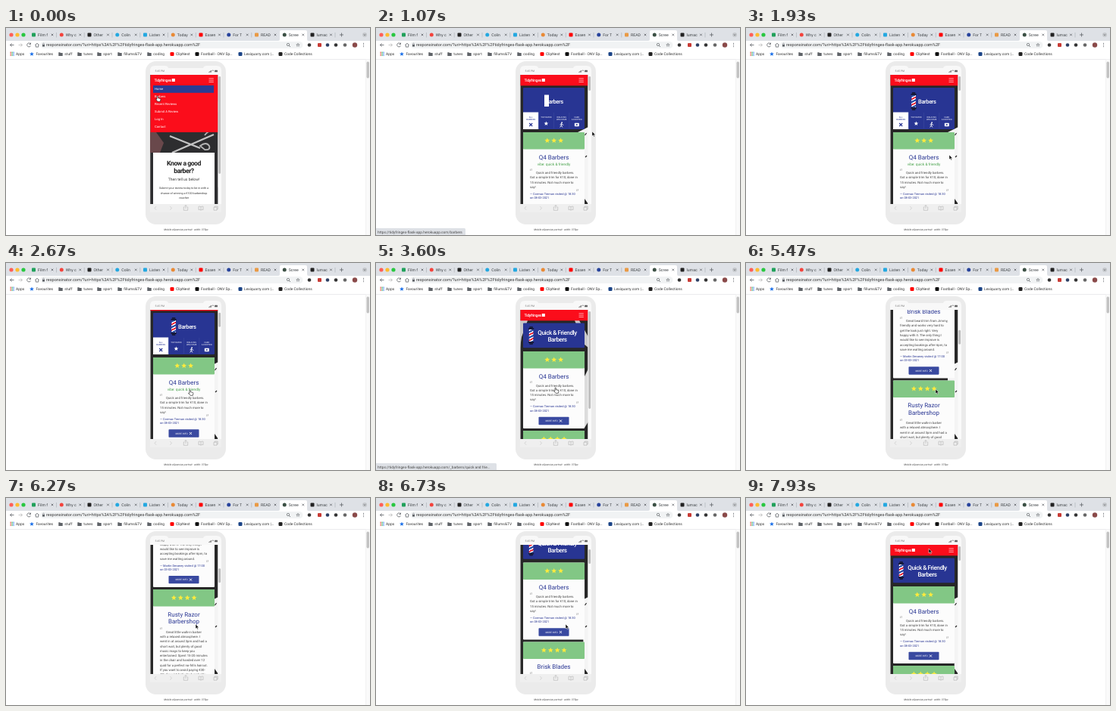
Recreate the animation shown at these times as an HTML page. Size 480x274 px, loop 8000 ms.

```html
<!DOCTYPE html>
<html lang="en">
<head>
<meta charset="utf-8">
<title>Barber reviews on a phone</title>
<style>
html, body { margin: 0; height: 100%; overflow: hidden; background: #fff; }
svg { display: block; width: 100vw; height: 100vh; font-family: Roboto, "Open Sans", sans-serif; text-rendering: geometricPrecision; }
.m { text-anchor: middle; }
.head { letter-spacing: -.45px; font-weight: 500; }
.light { font-weight: 300; }
</style>
</head>
<body>
<svg id="stage" viewBox="0 0 480 274"></svg>
<script>
const RED = '#fb0d1b', NAVY = '#283593', GREEN = '#82c785', DARK = '#272727', LEADING = 6.3;
const SITE = 'tidyfringes-flask-app.herokuapp.com';

// Markup helpers; text is centred vertically on y.
const text = (x, y, size, str, fill = '#333', cls = '', extra = '') =>
  `<text x="${x}" y="${y + size * .36}" font-size="${size}" fill="${fill}" class="${cls}" ${extra}>${str}</text>`;
const rect = (x, y, w, h, fill, r = 0, extra = '') =>
  `<rect x="${x}" y="${y}" width="${w}" height="${h}" rx="${r}" fill="${fill}" ${extra}/>`;
const dot = (x, y, r, fill) => `<circle cx="${x}" cy="${y}" r="${r}" fill="${fill}"/>`;
const line = (d, color = '#5f6368', width = .8) =>
  `<path d="${d}" fill="none" stroke="${color}" stroke-width="${width}"/>`;
const shape = (d, fill) => `<path d="${d}" fill="${fill}"/>`;
const each = (list, fn) => list.map(fn).join('');

function star(x, y, r, fill) {
  let pts = '';
  for (let i = 0; i < 10; i++) {
    const a = i * Math.PI / 5, q = i % 2 ? r * .45 : r;
    pts += `${x + q * Math.sin(a)},${y - q * Math.cos(a)} `;
  }
  return `<polygon points="${pts}" fill="${fill}"/>`;
}

const cross = (x, y, s, fill) =>
  line(`M${x - s} ${y - s}l${2 * s} ${2 * s}m0 ${-2 * s}l${-2 * s} ${2 * s}`, fill, s * .6);

function browser() {
  const tabs = [['Film f', '#20a15a'], ['Why c', '#f4433c'], ['Other', '#222'], ['Colin', '#24a8e0'],
    ['Listen', '#24a8e0'], ['Today', '#e98a35'], ['Essen', '#f00'], ['For T', '#27439c'],
    ['READ', '#e99a45'], ['Scree', '#3c5145'], ['lumac', '#222']];
  const folders = [[72, 'stuff'], [97, 'tunes'], [123, 'sport'], [150, 'fillums&amp;TV'], [189, 'coding']];
  const sites = [[219, 'ClipNest', '#f00'], [252, 'Football - ONV Sp…', '#111'],
    [309, 'Lexiquarry.com |…', '#1c4587'], [362, 'Code Collections', '#222']];
  const addOns = [[400, '#333'], [424, '#2c3e63'], [435, '#333'], [447, '#666']];
  return rect(0, 0, 480, 17, '#dee1e6')
    + dot(7, 9, 2.6, '#ff5f57') + dot(15, 9, 2.6, '#febc2e') + dot(23, 9, 2.6, '#28c840')
    + shape('M359 17q2 0 2-2V5q0-2 2-2h32q2 0 2 2v10q0 2 2 2z', '#fff')
    + each(tabs, ([name, color], i) => {
      const x = 36.5 + i * 36.75;
      return rect(x - 2.5, 6.5, 5, 5, color, i % 2 ? 2.5 : 1) + text(x + 5.5, 9, 5.2, name, '#3c4043')
        + cross(x + 24.5, 9, 1.3, '#5f6368')
        + (i == 8 || i == 9 ? '' : line(`M${x + 30} 6v6.5`, '#9aa0a6', .5));
    })
    + line('M440 9h5m-2.5-2.5v5') + dot(473, 9, 3, '#c5c8cc') + line('M471.7 8.5l1.3 1.2l1.3-1.2', '#444', .6)
    + line('M10.5 22.5h-5m2.2-2.2l-2.2 2.2l2.2 2.2')
    + line('M16.5 22.5h5m-2.2-2.2l2.2 2.2l-2.2 2.2', '#bbb')
    + line('M32.3 21a2.5 2.5 0 1 0 .2 2.5m0-4v2h-2')
    + line('M38.5 22.5l2.5-2.3l2.5 2.3m-4.2-.4v3h3.4v-3')
    + rect(45.5, 18, 346, 9, '#f1f3f4', 4.5)
    + rect(48, 22, 3, 2.6, '#5f6368') + line('M48.6 22v-1a.9 .9 0 0 1 1.8 0v1', '#5f6368', .5)
    + text(53, 22.5, 5.5, `responsinator.com/?uri=https%3A%2F%2F${SITE}%2F`, '#333')
    + `<circle cx="372" cy="22" r="1.7" fill="none" stroke="#5f6368" stroke-width=".7"/>` + line('M373.2 23.2l1.8 1.8')
    + star(385, 22.5, 2.8, '#5f6368') + star(385, 22.6, 1.6, '#f1f3f4')
    + each(addOns, ([x, color]) => dot(x, 22.5, 2.3, color))
    + rect(411, 20, 5, 5, '#c83b35', 1) + dot(460, 22.5, 3.2, '#8a4a4a')
    + each([20.4, 22.5, 24.6], y => dot(471.5, y, .55, '#5f6368'))
    + each([0, 1, 2, 3, 4, 5, 6, 7, 8], i => rect(5.5 + i % 3 * 2, 31.6 + (i / 3 | 0) * 2, 1.3, 1.3, ['#e8483a', '#34a853', '#4285f4'][i % 3]))
    + text(13, 34.5, 4.9, 'Apps') + star(34, 34.5, 3, '#1a6fe8') + text(39.5, 34.5, 4.9, 'Favourites')
    + each(folders, ([x, name]) => shape(`M${x - 2.7} 32.2h2l.7 .8h2.7v4h-5.4z`, '#5f6368') + text(x + 5.3, 34.5, 4.9, name))
    + each(sites, ([x, name, color]) => rect(x - 2.5, 32, 5, 5, color, 1.2) + text(x + 5, 34.5, 4.9, name))
    + rect(0, 41, 480, .6, '#dcdee1')
    + rect(474, 41.6, 6, 233, '#fafafa') + rect(474, 41.6, .4, 233, '#e5e5e5') + rect(475.5, 44.5, 3.4, 22, '#c1c1c1', 1.7);
}

const phoneBody = () => rect(184, 44, 106, 216, '#ebebeb', 14)
  + shape('M190 62v-6q0-6 6-6h14q3 0 4 3h46q1-3 4-3h14q6 0 6 6v6z', '#f8f8f8')
  + rect(190, 62, 94, 172, '#fff')
  + text(196.5, 57, 3.4, '5:45 PM', '#777')
  + each([0, 1, 2, 3], i => rect(267 + i, 58 - i * .7, .7, .8 + i * .7, '#666'))
  + line('M271.6 56.6q1.2-1.2 2.4 0', '#666', .8) + rect(275, 55.8, 4, 2.4, '#666', .5);

const phoneBar = () => rect(190, 233, 94, 11, '#efefef')
  + line('M198 236.2l-2 2.2l2 2.2M216.5 236.2l2 2.2l-2 2.2', '#c4c4c4', .7)
  + line('M235.3 237h-1v4.3h5.4v-4.3h-1m-1.7 2v-4.4m-1.5 1.5l1.5-1.5l1.5 1.5', '#b0b0b0', .6)
  + line('M257 236.8q-1.5-1.2-3-.5v4.3q1.5-.5 3 .5q1.5-1 3-.5v-4.3q-1.5-.7-3 .5v4.3', '#b0b0b0', .6)
  + line('M274 237.2h4v4h-4zm1.2 0v-1.2h4v4h-1.2', '#b0b0b0', .6)
  + text(237.5, 267, 3.4, 'Mobile eXpensive portrait · width: 375px', '#444', 'm', 'font-style="italic"');

// The photo behind the cards sits differently until the page has its full height.
const backdrop = () => rect(190.5, 62, 89, 172, DARK)
  + `<g id="settled">${shape('M280 131L266 138V174L242 182H273L275 226L280 233z', '#f4f4f4')}
    ${line('M275.5 142l2-3M276 171l2-2', DARK, 1.2)}</g>`
  + `<g id="settling">${shape('M190 76h10l-8 22l-2 14zM262 76h6l12 22v14l-5-4z', '#c9c9c9')}
    ${shape('M275 150l5-10v70l-5 8z', '#dcdcdc')}</g>`;

const header = () => rect(190.5, 62, 89, 14.3, RED)
  + text(195.5, 69, 5.2, 'Tidyfringes', '#fff', '', 'font-weight="500" letter-spacing="-.35"')
  + rect(218.8, 67, 4, 4, '#fff')
  + each([66.6, 68.8, 71], y => rect(267.5, y, 6.3, .6, '#fff'));

function home() {
  const items = ['Home', 'Barbers', 'Recent Reviews', 'Submit A Review', 'Log In', 'Contact'];
  return rect(190.5, 62, 89, 172, '#2d2d2f')
    + shape('M190 138h8l10 14l-5 13h-13z', '#69484b')
    + line('M216 143L256 159M219 165L274 141', '#c4c4c4', 2.4)
    + line('M256 156q8-6 12 0q2 6-6 5zM262 142q6-8 14-5', '#b4b4b4', 1.8)
    + header() + rect(190.5, 76, 89, 62, RED) + rect(194, 76, 80, 9.8, '#2a3c94')
    + each(items, (name, i) => text(196, 80.5 + i * 9.9, 4.2, name, '#fff'))
    + rect(194, 165, 81, 70, '#fff')
    + each(['Know a good', 'barber?'], (s, i) => text(234.5, 179 + i * 10.3, 8.7, s, '#222', 'm', 'font-weight="700" letter-spacing="-.5"'))
    + text(234.5, 200, 5, 'Then tell us below!', '#333', 'm')
    + each(['Submit your review today to be in with a', 'chance of winning a €100 barbershop', 'voucher'],
      (s, i) => text(234.5, 212 + i * 6.2, 3.7, s, '#333', 'm'));
}

const pole = (x, y) => rect(x + .8, y + 3, 5.6, 18, 'url(#stripes)')
  + rect(x, y + 2, 7.2, 2, '#161a3c', .6) + rect(x + 1.2, y, 4.8, 2.4, '#161a3c', 1)
  + rect(x, y + 20, 7.2, 2, '#161a3c', .6) + rect(x + 1.2, y + 21.5, 4.8, 2.5, '#161a3c', 1);

const cardHeight = c => 102 + (c.lines.length - 4) * LEADING + (c.title.length - 1) * 11 + (c.vibe ? 8.5 : 0);

function card(y, c) {
  const n = c.stars, h = cardHeight(c);
  const top = y + 45 + (c.title.length - 1) * 11 + (c.vibe ? 8.5 : 0);
  const end = y + h;
  let s = rect(194, y, 81, h, '#fcfcfc', 1) + rect(194, y, 81, 22.5, GREEN, 1);
  for (let i = 0; i < n; i++) s += star(234.7 + (i - (n - 1) / 2) * 8.9, y + 11, 3.6, '#ffeb3b');
  s += each(c.title, (line, i) => text(234.5, y + 33 + i * 9.3, 8, line, NAVY, 'm'));
  if (c.vibe) s += text(234.5, y + 42, 4.8, c.vibe, '#43a047', 'm');
  s += text(202.5, top - .5, 13, '“', '#aaa', 'light') + text(263.5, end - 30.5, 13, '”', '#aaa', 'light');
  s += each(c.lines, (line, i) => text(i ? 203 : 211, top + i * LEADING, 4.25, line, '#444'));
  return s + text(203, end - 29, 3.95, `— ${c.by[0]}`, NAVY) + text(203, end - 23.7, 3.95, c.by[1], NAVY)
    + rect(214.5, end - 15.2, 40, 10.4, '#3949a0', .8)
    + text(231.5, end - 10, 3.1, 'MORE INFO', '#fff', 'm') + cross(243.5, end - 10, 1.5, '#fff');
}

const first = {
  stars: 3, title: ['Q4 Barbers'], by: ['Cormac Tiernan visited @ 18:30', 'on 08-03-2021'],
  lines: ['Quick and friendly barbers.', 'Got a simple trim for €10, done in', '15 minutes. Not much more to', 'say!']
};
const reviews = [first, {
  stars: 4, title: ['Brisk Blades'], by: ['Martin Devaney visited @ 17:00', 'on 03-03-2021'],
  lines: ['Great beard trim from Jimmy,', 'friendly and works very hard to', 'get the look just right. Very', 'happy with it. The only thing I',
    'would like to see improve is', 'accepting bookings after 6pm, to', 'save me waiting around.']
}, {
  stars: 4, title: ['Rusty Razor', 'Barbershop'], by: ['Cormac Tiernan visited @ 15:00', 'on 01-03-2021'],
  lines: ['Great little walk-in barber', 'with a relaxed atmosphere. I', 'went in at around 3pm and had a', 'short wait, but plenty of good',
    'music mags to keep you', 'entertained. Spent 15-20 minutes', 'in the chair and handed over 12', 'quid for a perfect no-frills haircut.',
    'If you want to avoid paying €30-', '40+ for a ‘stylist’ which probably', 'does the same, come here.']
}];

function listPage() {
  const tabs = [['ALL', 'BARBERS'], ['TOP RATED', ''], ['WALK INS', 'WELCOME'], ['CARD', 'ACCEPTED']];
  const icons = [x => cross(x, 128, 2, NAVY), x => star(x, 126.5, 3, '#fff'),
    x => dot(x + .5, 125.2, .9, '#fff') + line(`M${x - 2} 128l2-1.6l1 1.4l1.6 .6M${x} 126.6l-.3 2.4l-1.6 2.4m1.6-2.4l1.6 2.4`, '#fff', .9),
    x => rect(x - 3, 125.8, 6, 4.4, '#fff', .7) + dot(x, 128, 1, NAVY)];
  return header() + rect(194, 79, 81, 55, NAVY, 1) + rect(194, 111.5, 20.2, 22.5, '#fff')
    + `<g id="loading">${text(235, 97, 7.6, 'Barbers', '#fff', 'm head')}${rect(222, 88.5, 6, 15.5, '#fff')}</g>`
    + `<g id="loaded">${text(238.8, 97, 7.6, 'Barbers', '#fff', 'm head')}${pole(217.5, 85)}</g>`
    + each(tabs, (words, i) => {
      const x = 204.2 + i * 20.2, color = i ? '#fff' : NAVY;
      return text(x, 117.5, 2.8, words[0], color, 'm') + text(x, 121.3, 2.8, words[1], color, 'm')
        + (i ? line(`M${x - 10} 112v21`, '#4a56a8', .4) : '') + icons[i](x);
    })
    + card(138, { ...first, vibe: 'vibe: quick &amp; friendly' });
}

function vibePage() {
  let y = 117;
  return header() + rect(194, 79.5, 81, 32.7, NAVY, 1) + pole(201, 84)
    + each(['Quick &amp; Friendly', 'Barbers'], (s, i) => text(239, 92 + i * 9, 8.1, s, '#fff', 'm head'))
    + each(reviews, c => {
      const out = card(y, c);
      y += cardHeight(c) + 3;
      return out;
    });
}

stage.innerHTML = `<defs>
  <clipPath id="screen">${rect(190, 62, 94, 171.5, '#000')}</clipPath>
  <linearGradient id="stripes" gradientUnits="userSpaceOnUse" x1="0" y1="0" x2="3" y2="6" spreadMethod="repeat">
    <stop offset=".3" stop-color="#e23"/><stop offset=".3" stop-color="#fff"/><stop offset=".5" stop-color="#fff"/>
    <stop offset=".5" stop-color="#35a"/><stop offset=".8" stop-color="#35a"/><stop offset=".8" stop-color="#fff"/>
  </linearGradient></defs>`
  + rect(0, 0, 480, 274, '#fff') + browser() + phoneBody()
  + `<g clip-path="url(#screen)">${backdrop()}
    <g id="home">${home()}</g><g id="list">${listPage()}</g><g id="vibe">${vibePage()}</g>
    ${rect(279.5, 62, 4.5, 172, '#fafafa')}${rect(280.3, 0, 2.8, 19, '#bdbdbd', 1.4, 'id="thumb"')}</g>`
  + phoneBar()
  + `<g id="status">${rect(-2, 265, 120, 11, '#dee1e6', 1.5, 'id="statusBox"')}${text(2, 269.8, 4.8, '', '#444', '', 'id="statusText"')}</g>
  <path id="arrow" d="M0 0v6l1.4-1.2l1 2.2l1-.4l-1-2.2h1.9z" fill="#000" stroke="#fff" stroke-width=".5"/>
  <path id="hand" d="M0 .4q.8-.9 1.3 0v2.2l3.2 .9q.6 .3 .4 1.2l-.6 2.6h-3.2l-2.6-2.9q.3-.9 1.5 0z" fill="#fff" stroke="#111" stroke-width=".6"/>`;

const $ = id => document.getElementById(id);
const show = (id, on) => $(id).style.display = on ? '' : 'none';

// Keys are [time, ...values], joined by straight lines.
const pointer = [[0, 199, 90], [670, 199, 90], [730, 215, 100], [870, 215, 100], [930, 270, 126], [1070, 285, 137],
  [1400, 285, 137], [1870, 293, 168], [1930, 268, 168], [2070, 268, 168], [2530, 242, 168], [3070, 242, 168],
  [3200, 236, 165], [4270, 236, 165], [4530, 250, 167], [7070, 250, 167], [7400, 205, 36], [7530, 187, 40],
  [7670, 187, 40], [7730, 192, 49], [7870, 192, 49], [7930, 241, 67], [8000, 241, 67]];
const scrolls = [[0, 0], [2070, 0], [2530, 13], [3399, 13], [3400, 0], [4730, 0], [4870, 42], [5530, 205],
  [5870, 225], [6270, 225], [6340, 210], [6800, 0], [8000, 0]];

function at(keys, t) {
  const i = keys.findIndex(k => k[0] > t), a = keys[i - 1], b = keys[i];
  const f = (t - a[0]) / (b[0] - a[0]);
  return a.slice(1).map((v, j) => v + (b[j + 1] - v) * f);
}

function draw() {
  const t = performance.now() % 8000;
  const page = t < 1070 ? 'home' : t < 3400 ? 'list' : 'vibe';
  const [scroll] = at(scrolls, t), [x, y] = at(pointer, t);
  for (const id of ['home', 'list', 'vibe']) show(id, id == page);
  $(page).setAttribute('transform', `translate(0 ${-scroll})`);
  show('loading', t < 1130);
  show('loaded', t >= 1130);

  const short = t < 1070 || t >= 3400 && t < 3800;
  show('settling', short);
  show('settled', !short);
  $('thumb').setAttribute('y', 64 + scroll * .13);
  $('thumb').setAttribute('height', short ? 129 : 19);

  const onVibe = t >= 3070 && t < 4300;
  show('status', onVibe || t >= 270 && t < 1400);
  $('statusBox').setAttribute('width', onVibe ? 161 : 120);
  $('statusText').textContent = `https://${SITE}/` + (onVibe ? '_barbers/quick and frie...' : 'barbers');

  const hand = t < 670 || t >= 2530 && t < 4270;
  show('hand', hand);
  show('arrow', !hand);
  $(hand ? 'hand' : 'arrow').setAttribute('transform', `translate(${x} ${y})`);
  requestAnimationFrame(draw);
}
draw();
</script>
</body>
</html>
```
